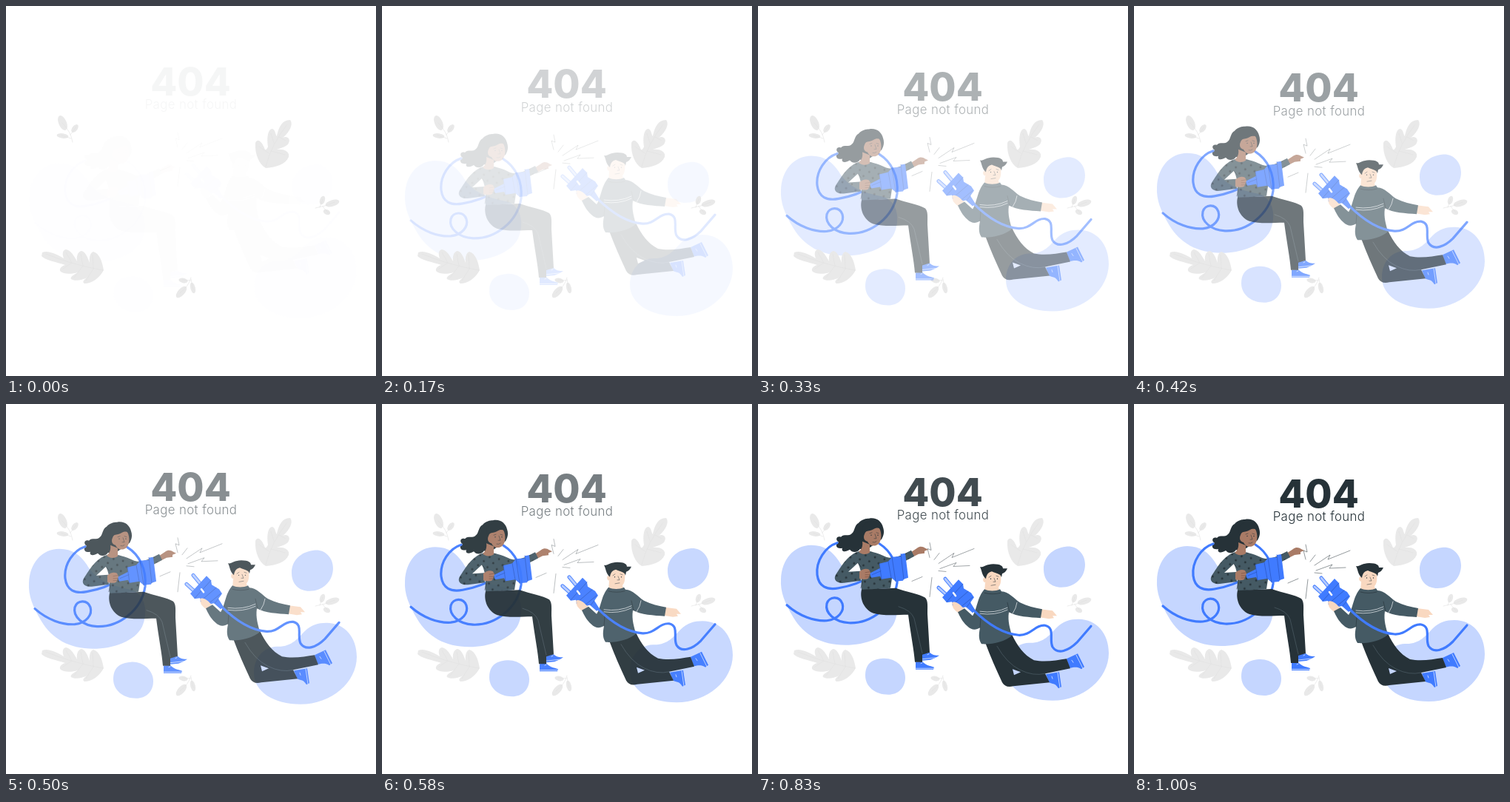
Write an HTML page that moves like this. It is 500 px wide and 500 px high and loops after 1040 ms.

```html
<!DOCTYPE html>
<html lang="en">
<head>
<meta charset="utf-8">
<title>Page not found</title>
<style>
html, body { margin: 0; width: 100%; height: 100%; overflow: hidden; background: #fff; }
svg { display: block; width: 100vw; height: 100vh; }
text { font-family: Inter, "Open Sans", sans-serif; text-anchor: middle; fill: var(--ink); }
:root { --ink: #263238; --knit: #455a64; --blue: #407bff; --navy: #2a55bd; --tan: #a97b66; --pale: #f9d8c0; }
.line { fill: none; stroke-linecap: round; stroke-linejoin: round; }
.thin { stroke: var(--ink); stroke-width: .5; }
.wire { stroke: var(--blue); stroke-width: 3.2; }
.leaf { fill: #e9e9e9; }
.vein { stroke: #e1e1e1; stroke-width: .6; }
.blob { fill: #c5d6ff; }
.ink { fill: var(--ink); }
.knit { fill: var(--knit); }
.blue { fill: var(--blue); }
.tan { fill: var(--tan); }
.pale { fill: var(--pale); }
.edge { stroke: var(--navy); stroke-width: .7; }
.seam { stroke: #5d6f78; stroke-width: .5; }
.fold { stroke: var(--ink); stroke-width: .6; }
.sole { stroke: #dce7ff; stroke-width: .8; }
</style>
</head>
<body>
<svg viewBox="0 0 500 500">
  <defs>
    <pattern id="dots" width="13" height="14" patternUnits="userSpaceOnUse" patternTransform="rotate(12)">
      <rect width="13" height="14" fill="#455a64"/>
      <circle cx="3" cy="3" r="1.4" fill="#263238"/>
      <circle cx="9.5" cy="10" r="1.4" fill="#263238"/>
    </pattern>
  </defs>

  <g data-move="up" class="blob">
    <path d="M72 192C90 192 101 201 109 213C123 238 150 243 168 247C190 253 192 280 184 297C174 317 145 327 118 327C85 327 62 313 48 290C36 270 30 255 31 238C32 212 48 192 72 192Z"/>
    <path d="M169 345C185 344 199 356 199 371C199 385 189 394 176 394C158 394 145 383 145 368C145 353 153 346 169 345Z"/>
    <path d="M416 194C430 192 442 203 442 218C442 236 428 249 410 249C396 249 386 240 386 224C386 208 398 196 416 194Z"/>
    <path d="M433 292C458 292 474 312 474 338C474 372 440 402 398 402C362 402 335 385 335 360C335 340 347 325 366 324C386 325 394 313 404 303C412 295 422 292 433 292Z"/>
  </g>

  <!-- leaves -->
  <g class="leaf">
    <path d="M384 154C389 160 382 172 374 178C380 175 386 180 381 187C377 191 370 192 366 194C374 193 384 196 382 204C378 214 364 218 351 219C342 214 336 200 337 185C340 178 346 183 350 194C351 195 353 193 354 190C352 178 354 166 360 166C364 167 364 174 366 176C368 166 372 154 384 154Z"/>
    <path d="M49 333C56 330 66 334 78 341C76 335 76 330 81 329C88 330 92 338 96 345C95 338 97 332 102 331C108 332 111 342 113 347C112 340 114 333 118 332C126 334 130 345 132 357C126 368 116 375 106 375C102 373 106 369 110 367C102 371 92 372 88 369C86 366 92 363 97 360C88 363 76 362 73 358C72 354 76 351 80 350C68 346 52 343 48 338Z"/>
    <ellipse cx="76.5" cy="158" rx="5.4" ry="10.5" transform="rotate(-23 76.5 158)"/>
    <ellipse cx="93" cy="165.5" rx="3.6" ry="6.3" transform="rotate(38 93 165.5)"/>
    <ellipse cx="76.5" cy="175.5" rx="8" ry="3.3" transform="rotate(8 76.5 175.5)"/>
    <ellipse cx="441" cy="266.5" rx="9.7" ry="4.3" transform="rotate(-17 441 266.5)"/>
    <ellipse cx="427.5" cy="262.5" rx="3.4" ry="6" transform="rotate(18 427.5 262.5)"/>
    <ellipse cx="433.5" cy="278.5" rx="5" ry="3.3" transform="rotate(28 433.5 278.5)"/>
    <ellipse cx="237" cy="386.5" rx="4.6" ry="9.7" transform="rotate(42 237 386.5)"/>
    <ellipse cx="239.5" cy="371" rx="6.2" ry="3.2" transform="rotate(12 239.5 371)"/>
    <ellipse cx="252.5" cy="381" rx="3.3" ry="7.5" transform="rotate(-14 252.5 381)"/>
  </g>
  <path class="line vein" d="M380 160Q358 188 351 217M362 185L358 172M355 199L342 190M369 177L378 182M358 196L377 201M54 335Q90 350 131 357M89 347L81 333M104 351L101 335M118 355L117 336M89 347L77 355M104 351L92 367M118 355L108 371M76 158Q88 170 90 184M87 174L95 163M75 175L88 179M418 273L431 270L444 265M424 272L428 261M428 271L435 279M235 388Q247 379 250 367M249 371L238 370M250 369L253 383"/>

  <!-- sparks -->
  <path data-move="slide" class="line thin" d="M232 190L234 200L229 198L232 210M238 213L245 204M244 218L265 204L262 210L292 198M246 225L268 217L264 222L286 221M244 228L254 229M235 237L232 263M208 242L222 236"/>

  <path data-move="up" class="line wire" d="M39 273C56 288 76 295 93 294C109 292 117 281 114 271C110 260 96 261 93 271C90 284 104 296 123 297C153 298 183 275 188 243C190 219 180 200 164 190"/>

  <!-- woman -->
  <g data-move="up">
    <path class="ink" d="M150 156C160 154 167 160 169 168C171 174 170 179 167 184L150 196C145 196 143 200 138 197C134 203 127 202 124 198C118 202 112 201 114 196C106 198 103 191 109 188C104 185 106 179 112 181C116 176 123 181 127 176C131 173 130 165 136 162C140 157 146 156 150 156Z"/>
    <path class="line wire" d="M107 189C91 194 78 213 80 232C82 248 93 253 109 250C126 247 139 243 152 234"/>
    <path class="tan" d="M206 202L215 196C219 193 223 194 226 196L230 198L225 200L225 203L217 204L209 208Z"/>
    <path fill="url(#dots)" d="M137 200C147 198 160 202 171 207C181 212 192 207 207 199L211 207C200 213 194 217 184 218L179 250L140 253C139 242 142 230 135 216L122 228L138 227L139 240L116 243C107 244 101 239 105 232C113 220 121 205 137 200Z"/>
    <path class="line fold" d="M135 216L140 222M173 215L183 217M141 241L139 250"/>
    <path class="tan" d="M141 187L151 191L151 202C145 206 139 204 136 201C140 198 142 193 141 187Z"/>
    <path class="tan" d="M144 177C146 171 155 168 164 169C168 177 167 187 162 191C156 195 150 192 148 187C143 186 142 181 144 177Z"/>
    <path class="ink" d="M142 175C148 172 155 173 161 167L166 171C168 166 163 160 154 159C145 160 139 167 142 175Z"/>
    <path class="line thin" d="M151 176L154 175M160 175L163 176M158 177L160 183L157 183M155 188Q158 189 160 187"/>
    <g class="ink"><circle cx="153" cy="178.5" r=".7"/><circle cx="162" cy="178.5" r=".7"/></g>

    <path class="blue" d="M222 339L232 337C236 341 240 341 245 341C241 344 236 346 233 347L222 348ZM213 350L222 349C226 354 232 355 238 357L237 360L213 360Z"/>
    <path class="line sole" d="M222 346L240 344M213 358.5H238M229 340L231 339M220 352L222 351"/>
    <path class="ink" d="M140 252L186 250C200 255 218 258 226 263C230 267 229 275 229 285L232 337L222 340L222 350L212 350C211 335 206 310 203 286C188 286 170 288 156 284C143 279 137 264 140 252Z"/>
    <path class="line seam" d="M190 275Q207 280 211 291L222 338"/>

    <path class="blue" d="M151 230L165 223L164 217L176 214L181 208L193 207L193 204L199 203L203 236L197 238L196 240L186 241L180 236L167 238L165 234L153 236Z"/>
    <path class="line edge" d="M164 217L167 238M176 214L180 236M181 208L186 241M193 204L197 238M154 232L166 227"/>
    <path class="tan" d="M137 228C141 224 146 223 150 225L152 229L149 237C145 239 140 238 137 237Z"/>
    <path class="line" stroke="#754a3c" stroke-width=".6" d="M145 229L151 228M145 232L151 232M145 235L150 235"/>
  </g>

  <!-- man -->
  <g data-move="down">
    <path class="blue" d="M417 343L432 336L441 354L437 357C430 352 424 356 421 355ZM389 364L407 361L410 381L406 383C401 374 395 378 393 374Z"/>
    <path class="line sole" d="M430 338L439 356M405 362L408 382M424 345L426 348M397 367L398 370"/>
    <path class="ink" fill-rule="evenodd" d="M307 321L343 310C350 325 359 338 373 345C388 348 404 345 417 343L422 356L388 363L394 375L345 380C338 382 333 380 330 375C322 358 314 340 307 321ZM344 357L355 361L346 365Z"/>
    <path class="line seam" d="M323 326Q336 349 354 358T388 363"/>
    <path class="pale" d="M263 267L270 266L279 274L271 281C266 278 261 273 263 267ZM382 276L398 278L404 285L398 285L400 288L393 289L381 287ZM307 240H323L327 253H306Z"/>
    <path class="knit" d="M306 249C312 252 321 252 327 249L329 252C339 252 346 262 354 267C364 272 374 274 384 276L382 288C367 287 350 286 339 280C337 293 341 303 343 312C333 320 317 324 302 323C297 316 299 307 300 301C294 305 288 304 283 299C276 293 273 286 270 280L279 275L290 285C296 277 296 260 306 249Z"/>
    <path class="line" stroke="#d8dee1" stroke-width=".8" d="M300 279Q320 282 337 274M300 282Q320 285 337 277M350 267Q349 275 344 282"/>
    <path class="line fold" d="M306 254Q317 257 328 254M337 267L340 280M300 301L301 288"/>
    <path class="pale" d="M307 229C312 223 325 223 328 230C329 238 328 246 322 248C315 250 309 247 308 240C303 240 303 233 307 233Z"/>
    <path class="ink" d="M300 219C305 220 308 215 318 215C328 215 331 218 331 221L337 221C335 225 333 227 330 228L329 233C328 228 322 228 316 225C312 226 309 228 308 235C302 230 303 224 300 219Z"/>
    <path class="line thin" d="M312 233L315 231M322 231L325 232M319 234L321 239L318 239M315 244L321 243"/>
    <g class="ink"><circle cx="314.5" cy="235" r=".7"/><circle cx="323.5" cy="235" r=".7"/></g>

    <path class="line wire" d="M291 277C305 291 326 309 352 311C369 312 374 297 388 298C402 301 393 317 398 327C405 338 420 332 431 321L450 299"/>
    <path class="line" stroke="#407bff" stroke-width="5" d="M253 235L263 247M244 247L255 257"/>
    <path class="line" stroke="#b3caff" stroke-width="3" d="M253 235L263 247M244 247L255 257"/>
    <path class="blue" d="M249 260L271 236L277 242L278 248L288 254L292 260L287 267L294 278L290 281L281 273L271 275L263 270L262 266L255 267Z"/>
    <path class="line edge" d="M255 266L277 242M263 270L284 252M273 274L290 260M282 273L287 267"/>
    <path class="line" stroke="#fff" stroke-width="2.5" d="M264 254L267 258"/>
    <path class="pale" d="M262 267C265 265 269 267 273 270L278 275L272 277C267 275 263 271 262 267Z"/>
  </g>

  <g data-move="slide">
    <text x="249.5" y="140.3" font-size="52.5" font-weight="800">404</text>
    <text x="250" y="158.4" font-size="16.8" font-weight="300" letter-spacing=".4">Page not found</text>
  </g>
</svg>
<script>
const LOOP = 1040, STEP = 1000 / 24, TRAVEL = 20, LEAD = 0.04;
const parts = [...document.querySelectorAll('[data-move]')];
const bezier = (s, a, b) => 3 * (1 - s) ** 2 * s * a + 3 * (1 - s) * s * s * b + s ** 3;

// cubic-bezier(.36, -.01, .5, 1.38), solved by bisection
function ease(x) {
  let lo = 0, hi = 1;
  for (let i = 0; i < 24; i++) {
    const mid = (lo + hi) / 2;
    if (bezier(mid, 0.36, 0.5) < x) lo = mid; else hi = mid;
  }
  return bezier(hi, -0.01, 1.38);
}

function draw() {
  let k = Math.floor((performance.now() % LOOP + 4) / STEP);
  if (k < 2) k = 0; // the first pose is held twice as long
  const p = Math.min(1, k / 24 + LEAD), e = ease(p);
  for (const part of parts) {
    const move = part.dataset.move;
    const v = move === 'slide' ? p : e;
    const y = (move === 'up' ? 1 : -1) * TRAVEL * (1 - v);
    part.setAttribute('transform', `translate(0 ${y.toFixed(2)})`);
    part.setAttribute('opacity', Math.max(0, Math.min(1, v)));
  }
  requestAnimationFrame(draw);
}
draw();
</script>
</body>
</html>
```
